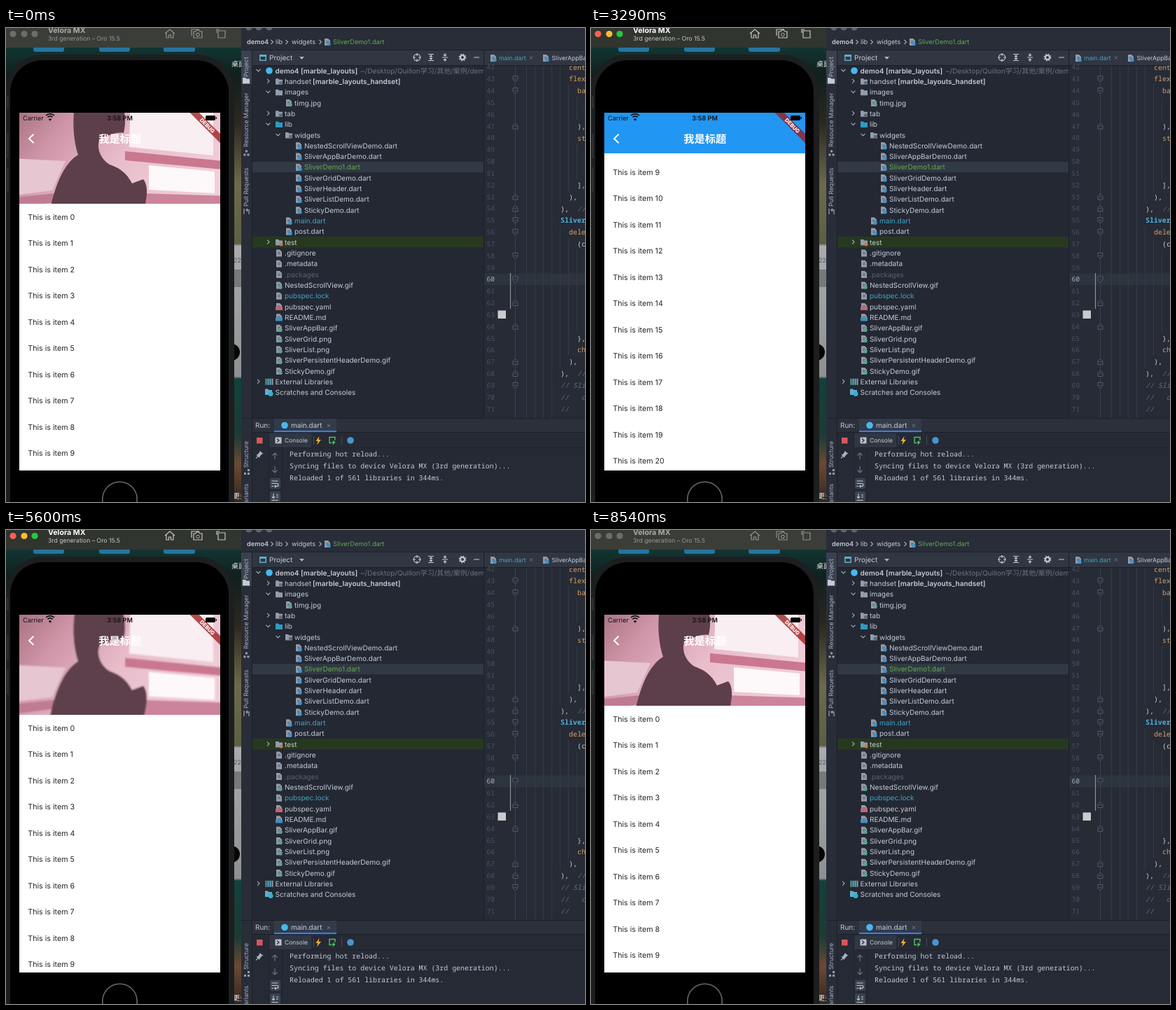
These frames come from a looping animation (827x677 px, 8.61 s). An HTML page:

```html
<!DOCTYPE html>
<html lang="en">
<head>
<meta charset="utf-8">
<title>Scrolling list demo</title>
<style>
html, body { margin: 0; width: 100%; height: 100%; overflow: hidden; background: #232834; }
svg { display: block; width: 100vw; height: 100vh; }
text { font-family: Inter, "Noto Sans CJK SC", "Noto Sans CJK", sans-serif; white-space: pre; text-rendering: geometricPrecision; }
.mono { font-family: "Noto Sans Mono", "DejaVu Sans Mono", monospace; }
</style>
</head>
<body>
<svg id="stage" viewBox="0 0 827 677" preserveAspectRatio="none">
  <defs>
    <clipPath id="screenClip"><rect x="19" y="121" width="287" height="511"/></clipPath>
    <clipPath id="headClip"><rect id="headClipRect" x="19" y="121" width="287" height="130"/></clipPath>
    <clipPath id="treeClip"><rect x="352" y="32" width="330" height="525"/></clipPath>
    <clipPath id="leftClip"><rect width="336" height="677"/></clipPath>
    <filter id="soft" x="-10%" y="-10%" width="120%" height="120%"><feGaussianBlur id="softBlur" stdDeviation="0"/></filter>
    <linearGradient id="wall" x2="0" y2="1">
      <stop offset="0" stop-color="#14433f"/><stop offset=".1" stop-color="#10201e"/>
      <stop offset=".2" stop-color="#2c281e"/><stop offset=".33" stop-color="#6d6a4c"/>
      <stop offset=".455" stop-color="#5c5f43"/><stop offset=".46" stop-color="#a9abad"/>
      <stop offset=".735" stop-color="#8e9092"/><stop offset=".74" stop-color="#12413c"/>
      <stop offset=".86" stop-color="#1d3b34"/><stop offset=".92" stop-color="#6b4a34"/>
      <stop offset="1" stop-color="#33261f"/>
    </linearGradient>
    <linearGradient id="blossom" x2="1" y2=".5">
      <stop offset="0" stop-color="#9a6473"/><stop offset=".3" stop-color="#cf95a8"/>
      <stop offset=".6" stop-color="#e9bdcb"/><stop offset="1" stop-color="#f0cfd9"/>
    </linearGradient>
  </defs>
  <g id="sim" clip-path="url(#leftClip)"></g>
  <g id="ide"></g>
</svg>
<script>
const NS = 'http://www.w3.org/2000/svg';
const $ = id => document.getElementById(id);
const LOOP = 8610, STEP = 70, ROW = 37.5, OPEN = 130, SHUT = 58;

function el(parent, tag, attrs = {}) {
  const node = document.createElementNS(NS, tag);
  for (const k in attrs) node.setAttribute(k, attrs[k]);
  return parent.appendChild(node);
}
const rect = (p, x, y, width, height, fill, more) => el(p, 'rect', { x, y, width, height, fill, ...more });
const dot = (p, cx, cy, r, fill, more) => el(p, 'circle', { cx, cy, r, fill, ...more });
const fillPath = (p, d, fill, more) => el(p, 'path', { d, fill, ...more });
const line = (p, d, stroke, width = 1, more) =>
  el(p, 'path', { d, fill: 'none', stroke, 'stroke-width': width, ...more });
function text(p, str, x, y, size, fill, more) {
  const node = el(p, 'text', { x, y: y + size * 0.36, 'font-size': size, fill, ...more });
  node.textContent = str;
  return node;
}
const mono = (p, str, x, y, fill, more) => text(p, str, x, y, 9.93, fill, { class: 'mono', ...more });
const BOLD = { 'font-weight': 600 };

// ---- simulator window ----
const sim = $('sim');
rect(sim, 0, 0, 336, 677, 'url(#wall)');
[[39, 44], [133, 44], [225, 45]].forEach(([x, w]) => rect(sim, x, 22, w, 12, '#25759f', { rx: 3 }));
text(sim, '桌面', 322, 51, 10, '#eee');
text(sim, '22', 325, 332, 9, '#55585a');
rect(sim, 326, 345, 10, 25, '#77797b');
dot(sim, 322, 463, 12, '#050505');
text(sim, '更多', 324, 668, 10, '#eee');
rect(sim, -1, 38, 327, 720, '#1d1e1f', { rx: 54 });
rect(sim, 6, 46, 312, 720, '#000', { rx: 46 });
line(sim, 'M2.5 97v18M2.5 150v36M2.5 199v36', '#303234', 2);
dot(sim, 162.5, 673, 24.7, 'none', { stroke: '#66686a', 'stroke-width': 1.6 });

const bar = rect(sim, 0, 0, 336, 28, '#3b3e38');
const lights = [10, 26, 41].map(x => dot(sim, x, 8.5, 4.6, '#6c6e69'));
const title = text(sim, 'Velora MX', 60, 3.4, 10.6, '#fff', { 'font-weight': 700 });
const subtitle = text(sim, '3rd generation – Oro 15.5', 60, 14.5, 8.7, '#ccc');
const tools = line(sim, 'M227 8l7-6 7 6M229 7v7h3.5v-4h3v4h3.5v-7M265 11v-9h11M268 5h3l1.5-2h3l1.5 2h3v9h-12zM303 4h10v10h-10zM301 7v-5h4', '#aaa', 1.2);
dot(sim, 274, 9.5, 2.3, 'none', { stroke: '#aaa', 'stroke-width': 1 });

const app = el(sim, 'g', { 'clip-path': 'url(#screenClip)' });
rect(app, 19, 121, 287, 511, '#fff');
const list = el(app, 'g');
for (let i = 0; i < 26; i++) text(list, 'This is item ' + i, 31.3, 270 + i * ROW, 10.7, '#242424');

const head = el(app, 'g', { 'clip-path': 'url(#headClip)' });
rect(head, 19, 121, 287, 200, '#2196f3');
const photo = el(head, 'g', { filter: 'url(#soft)' });
rect(photo, 5, 90, 315, 195, 'url(#blossom)');
fillPath(photo, 'M5 186L85 190 66 232 5 240Z', '#e6c6d1');
fillPath(photo, 'M178 95H296V182L176 170Z', '#f9eef1');
fillPath(photo, 'M170 176L320 191V203L170 189Z', '#c9788f');
fillPath(photo, 'M204 196L298 205V236L204 231Z', '#fdf8f9');
fillPath(photo, 'M190 236L320 240V285H190Z', '#cc849b');
fillPath(photo, 'M5 243L70 236V249L5 257Z', '#bf7c90');
fillPath(photo, 'M104 85C92 124 96 160 103 181C84 193 68 222 58 285H190C200 252 206 228 196 216L180 222C172 206 160 199 148 195C136 188 128 172 134 158C146 154 158 148 168 150C174 126 167 98 150 85Z', '#5d3f4b');

text(app, 'Carrier', 24, 129, 9.1, '#111');
[6, 3.6].forEach(r => line(app, `M${63 - r} ${131 - r}a${r * 1.42} ${r * 1.42} 0 0 1 ${2 * r} 0`, '#111', 1.7));
fillPath(app, 'M60.8 130.2q2.2-1.8 4.4 0l-2.2 2.6z', '#111');
text(app, '3:58 PM', 162.5, 129, 9.1, '#111', { ...BOLD, 'text-anchor': 'middle' });
rect(app, 285, 125, 14, 7, '#000', { rx: 1.8 });
rect(app, 299.7, 127, 1.2, 3, '#000');
line(app, 'M39.5 151.8L33 158l6.5 6.2', '#fff', 2);
text(app, '我是标题', 162.8, 158, 15.3, '#fff', { ...BOLD, 'text-anchor': 'middle' });
const banner = el(app, 'g', { transform: 'translate(306 121) rotate(45)' });
rect(banner, -45, 21.4, 90, 9.2, '#000', { opacity: .3 });
rect(banner, -45, 21.4, 90, 9.2, '#b71c1c', { opacity: .65 });
text(banner, 'DEBUG', 0, 26, 7.6, '#fff', { 'font-weight': 800, 'text-anchor': 'middle' });

// ---- editor window ----
const ide = $('ide');
const INK = '#c5cbd6', DIM = '#6a7280', GREEN = '#62a850', CYAN = '#45a3c3', ICON = '#929caa', ORANGE = '#d9a05f';

function page(p, x, y, badge, square) {
  fillPath(p, `M${x - 4} ${y - 5}h5l3 3v7h-8z`, ICON);
  line(p, `M${x - 2} ${y - 1}h4m-4 2h4`, '#505a68', .9);
  if (badge && square) rect(p, x - 5, y, 10, 5, badge);
  else if (badge) dot(p, x + 2, y + 2.5, 2.7, badge);
}
const dart = (p, x, y) => page(p, x, y, '#3d93cf');
const folder = (p, x, y, c = ICON) => fillPath(p, `M${x - 5} ${y - 4}h4l1.5 1.5h4.5v7h-10z`, c);
const chevron = (p, x, y, open) =>
  line(p, open ? `M${x - 3} ${y - 1.5}l3 3 3-3` : `M${x - 1.5} ${y - 3}l3 3-3 3`, '#a4adba', 1.1);
const cross = (p, x, y) => line(p, `M${x - 2} ${y - 2}l4 4m0-4l-4 4`, '#777f8d', .9);

rect(ide, 336, 0, 491, 677, '#282d38');
rect(ide, 352, 54, 330, 503, '#232833');
rect(ide, 683, 54, 144, 503, '#262b36');
rect(ide, 352, 32, 475, 21, '#303642');
line(ide, 'M336 31.5H827M351.5 32V677M682.5 32V557M352 53.5H827M336 557.5H827M352 577.5H827', '#1b1f28');
[347, 361, 376].forEach(x => dot(ide, x, -1, 4.6, '#5d626c'));

// breadcrumb
text(ide, 'demo4', 344, 20, 9.2, INK, BOLD);
text(ide, 'lib', 385, 20, 9.2, INK);
text(ide, 'widgets', 408, 20, 9.2, INK);
text(ide, 'SliverDemo1.dart', 467, 20, 9.2, GREEN);
[380, 401, 449].forEach(x => chevron(ide, x, 20));
dart(ide, 459, 20);

// tool strip
rect(ide, 336, 32, 15, 48, '#3a414e');
[['Project', 70], ['Resource Manager', 170], ['Pull Requests', 255], ['Structure', 628], ['Build Variants', 707]]
  .forEach(([s, y]) => text(ide, s, 0, 0, 8.7, '#aab2bf', { transform: `translate(343 ${y}) rotate(-90)` }));
folder(ide, 343, 75, '#c5cbd6');
[[341, 181], [346, 181], [343.5, 176]].forEach(([x, y]) => dot(ide, x, y, 1.8, ICON));
line(ide, 'M340 258v8M347 266v-6h-4m2-2l-2 2 2 2', ICON, 1.3);
[[340, 635], [345, 635], [345, 630]].forEach(([x, y]) => rect(ide, x, y, 3, 3, ICON));

// project panel
rect(ide, 362, 38, 10, 9, '#62aeca');
rect(ide, 363.5, 41, 7, 4.5, '#303642');
text(ide, 'Project', 376, 42.7, 10, INK);
fillPath(ide, 'M419 41h7l-3.5 4z', '#aab2bf');
dot(ide, 587, 42, 4.6, 'none', { stroke: INK, 'stroke-width': 1.1 });
line(ide, 'M587 36v4m0 4v4M581 42h4m4 0h4M603 37.5h8m-8 9h8M607 39v6m-2-4l2-2 2 2m-4 2l2 2 2-2M623 42h8M627 36v4m-2-2l2 2 2-2M627 48v-4m-2 2l2-2 2 2M668 42h8', INK, 1.1);
dot(ide, 652, 42, 3, 'none', { stroke: INK, 'stroke-width': 2 });
dot(ide, 652, 42, 4.7, 'none', { stroke: INK, 'stroke-width': 1.4, 'stroke-dasharray': '1.8 1.9' });

// depth, chevron (o open, c closed, - none), kind, label, colour
const rows = `0o logo demo4 [marble_layouts]
1c module handset
1o folder images
2- image timg.jpg
1c module tab
1o lib lib
2o module widgets
3- dart NestedScrollViewDemo.dart
3- dart SliverAppBarDemo.dart
3- dart SliverDemo1.dart ${GREEN}
3- dart SliverGridDemo.dart
3- dart SliverHeader.dart
3- dart SliverListDemo.dart
3- dart StickyDemo.dart
2- dart main.dart ${CYAN}
2- dart post.dart
1c test test
1- page .gitignore
1- page .metadata
1- page .packages #596170
1- image NestedScrollView.gif
1- page pubspec.lock ${CYAN}
1- yaml pubspec.yaml
1- md README.md
1- image SliverAppBar.gif
1- image SliverGrid.png
1- image SliverList.png
1- image SliverPersistentHeaderDemo.gif
1- image StickyDemo.gif
0c books External Libraries
0- notes Scratches and Consoles`.split('\n');

const draw = {
  logo: (p, x, y) => dot(p, x, y, 4.8, '#47b9ef'),
  folder,
  module: (p, x, y) => { folder(p, x, y); rect(p, x, y, 5, 4, '#5d6b7c'); },
  lib: (p, x, y) => folder(p, x, y, '#2f9ac4'),
  test: (p, x, y) => { folder(p, x, y); dot(p, x + 3, y + 3, 2.5, '#d9705a'); },
  page: (p, x, y) => page(p, x, y),
  dart,
  image: (p, x, y) => page(p, x, y, '#58a58a'),
  yaml: (p, x, y) => page(p, x, y, '#d0606c', true),
  md: (p, x, y) => page(p, x, y, '#3f8fc0', true),
  books: (p, x, y) => ['#58a58a', '#62aeca', '#62aeca', ICON]
    .forEach((c, i) => rect(p, x - 5.5 + i * 3, y - 4.5, 2, 9, c)),
  notes: (p, x, y) => { folder(p, x - 1, y - 1, '#62aeca'); dot(p, x + 2, y + 2, 3.5, '#36b0d0'); }
};

const tree = el(ide, 'g', { 'clip-path': 'url(#treeClip)' });
rect(tree, 352, 191, 330, 15.3, '#303944');
rect(tree, 352, 298, 330, 15.5, '#26391f');
rows.forEach((row, i) => {
  const [, depth, fold, kind, label, colour = INK] = row.match(/^(\d)(.) (\w+) ([^#]+?)(?: (#\w+))?$/);
  const x = 376 + 14 * depth, y = 61 + i * 15.32, tx = x + (depth === '0' ? 8.6 : 8);
  if (fold !== '-') chevron(tree, x - 15.5, y - .5, fold === 'o');
  draw[kind](tree, x, y);
  text(tree, label, tx, y, 10, colour, i ? {} : BOLD);
});
text(tree, '~/Desktop/Quillon学习/其他/案例/demo4', 506, 61, 10, DIM);
text(tree, '[marble_layouts_handset]', 438, 76.3, 10, INK, BOLD);

// editor
dart(ide, 696, 43);
text(ide, 'main.dart', 704, 42.5, 8.7, CYAN);
cross(ide, 750, 42.5);
dart(ide, 771, 43);
text(ide, 'SliverAppBarDemo.dart', 779.5, 42.5, 8.7, INK);

const lineY = n => 56 + (n - 42) * 16.83;
rect(ide, 683, 350.5, 144, 17, '#2c343e');
[743, 755, 767, 779].forEach(x => line(ide, `M${x}.5 54V557`, '#343b47'));
line(ide, 'M791.5 54V250M791.5 283V485M803.5 80V233M803.5 300V468M815.5 98V132M815.5 165V216M815.5 316V435', '#343b47');
for (let n = 42; n <= 71; n++)
  text(ide, n, 686.5, lineY(n), 9.6, n === 60 ? '#a4adba' : '#4a5261', { class: 'mono' });
line(ide, 'M727.5 54V557', '#3a414d');
const foldMark = (n, up) => {
  const y = lineY(n), s = up ? -1 : 1;
  fillPath(ide, `M724 ${y - 4 * s}h7v${5 * s}l-3.5 ${3 * s}-3.5 ${-3 * s}z`, '#262b36', { stroke: '#5b6371', 'stroke-width': .9 });
  line(ide, `M725.7 ${y}h3.6`, '#5b6371', .9);
};
[43, 44, 55, 56, 58, 60, 69].forEach(n => foldMark(n));
[47, 53, 54, 62, 64, 67, 68].forEach(n => foldMark(n, true));
line(ide, 'M720.5 350V401', '#8a919c', 1.2);
rect(ide, 702.5, 403.5, 11.5, 11.5, '#c9cbce');

const NOTE = '#666e7c';
[[42, 804, 'cent', ORANGE], [43, 804, 'flex', ORANGE], [44, 816, 'ba', ORANGE], [47, 816, '),', INK],
 [48, 816, 'st', ORANGE], [52, 816, '],', INK], [53, 804, '),', INK], [54, 792, '),', INK], [54, 816, '//', NOTE],
 [55, 792, 'Sliver', '#4fb3dd'], [56, 804, 'dele', ORANGE], [57, 816, '(c', INK], [65, 816, '},', INK],
 [66, 816, 'ch', ORANGE], [67, 804, '),', INK], [68, 792, '),', INK], [68, 816, '//', NOTE],
 [69, 792, '// Sli', NOTE], [70, 792, '//   c', NOTE], [71, 792, '//', NOTE]]
  .forEach(([n, x, s, c]) => mono(ide, s, x, lineY(n), c,
    c === NOTE ? { 'font-style': 'italic' } : n === 55 ? BOLD : {}));

// run panel
rect(ide, 352, 578, 475, 99, '#252a35');
rect(ide, 352, 558, 475, 19, '#2b303b');
text(ide, 'Run:', 356, 567.5, 10, INK);
rect(ide, 383, 558, 89, 19, '#343b48');
rect(ide, 383, 575, 89, 2.2, '#3f7edb');
dot(ide, 398, 567.5, 4.8, '#47b9ef');
text(ide, 'main.dart', 407, 567.5, 10, INK);
cross(ide, 461, 568);
rect(ide, 358, 585, 8.5, 8.5, '#d8575b');
line(ide, 'M375.5 578V677M394.5 599V677M376 599.5H827', '#1f242d');
rect(ide, 376, 579, 60, 20, '#303743');
rect(ide, 384.5, 584.5, 9, 9, '#b8c0cb', { rx: 1 });
line(ide, 'M387 586.5l3 2.5-3 2.5', '#252a35', 1.2);
text(ide, 'Console', 398, 589, 8.5, INK);
line(ide, 'M439.5 583v12M479.5 583v12', '#444c59');
fillPath(ide, 'M447.5 583l-5 7h3l-1.5 5.5 6-7.5h-3.4z', '#f2b032');
line(ide, 'M465 592.5h-3v-8h8v4M467 594l3-3', '#4fc35b', 1.4);
fillPath(ide, 'M469 588l-4 4.5h2.5l-1 3.5 4-5h-2.5z', '#4fc35b');
dot(ide, 492, 589, 4.8, '#4a94cf');
fillPath(ide, 'M362.5 604l5 4-2 .5-3 3.5-.5 2-4.5-4.5 2-.5 2.5-3z', '#aab2bf');
line(ide, 'M360 611.5l-3 3', '#aab2bf', 1.2);
line(ide, 'M384 616v-9m-3.5 3.5l3.5-3.5 3.5 3.5M384 626v9m-3.5-3.5l3.5 3.5 3.5-3.5', '#6b7482', 1.2);
rect(ide, 377, 643, 15, 15, '#3b4350', { rx: 2 });
rect(ide, 377, 662, 15, 15, '#3b4350', { rx: 2 });
line(ide, 'M379.5 647h9M379.5 650.5h7.5a2 2 0 0 1 0 4h-3m1.5-1.8l-1.8 1.8 1.8 1.8M379.5 654.5h2.5M379.5 674.5h9M382 665v6.5m-2-2l2 2 2-2M386 667h3m-3 3h3', INK, 1.1);
mono(ide, 'Performing hot reload...', 405, 608, INK);
mono(ide, 'Syncing files to device Velora MX (3rd generation)...', 405, 625, INK);
mono(ide, 'Reloaded 1 of 561 libraries in 344ms.', 405, 642, INK);

// ---- motion ----
const clamp = p => Math.max(0, Math.min(1, p));
const easeOut = p => 1 - (1 - clamp(p)) ** 3;
// seconds a phase has run at time t
const since = (t, from, to = LOOP) => (Math.min(t, to) - from) / 1000;

// overdamped spring back to the list top, from place x and speed v
function spring(s, x, v) {
  const slow = 9.08, fast = 22, a = (v + fast * x) / (fast - slow);
  return a * Math.exp(-slow * s) + (x - a) * Math.exp(-fast * s);
}

const DRAG = 366, GLIDE = 83.5, PULL = -42, HIT = 4620;
const glide = t => DRAG + GLIDE * (1 - Math.exp(-2 * since(t, 3010, 4270)));
const speed = -glide(4340) / since(HIT, 4340);

function scrollAt(t) {
  if (t < 3010) return DRAG * easeOut((t - 2310) / 560);
  if (t < 4340) return glide(t);
  if (t < HIT) return glide(4340) + speed * since(t, 4340);
  if (t < 5530) return spring(since(t, HIT), 0, speed);
  if (t < 6150) return PULL * easeOut((t - 5530) / 600);
  return spring(since(t, 6150), PULL, 0);
}

function update(t) {
  const scroll = scrollAt(t), over = Math.max(0, -scroll);
  const shrink = Math.min(OPEN - SHUT, Math.max(0, scroll)), shut = shrink / (OPEN - SHUT);
  list.setAttribute('transform', `translate(0 ${-scroll})`);
  $('headClipRect').setAttribute('height', OPEN + over - shrink);
  photo.setAttribute('transform', `translate(0 ${over / 2 - shrink / 4})`);
  photo.setAttribute('opacity', 1 - clamp((shut - .404) / .596));
  $('softBlur').setAttribute('stdDeviation', over * .1);

  const active = t >= 1260 && t < 8540;
  bar.setAttribute('fill', active ? '#30352f' : '#3b3e38');
  const on = ['#ff5f57', '#febc2e', '#28c840'];
  lights.forEach((l, i) => l.setAttribute('fill', active ? on[i] : '#6c6e69'));
  title.setAttribute('fill', active ? '#fff' : '#a9aba6');
  subtitle.setAttribute('fill', active ? '#c6c8c3' : '#959792');
  tools.setAttribute('stroke', active ? '#c6c8c3' : '#8f918c');
}

const begin = performance.now();
function tick() {
  const t = (performance.now() - begin) % LOOP;
  update(Math.floor(t / STEP) * STEP);
  requestAnimationFrame(tick);
}
tick();
</script>
</body>
</html>
```
